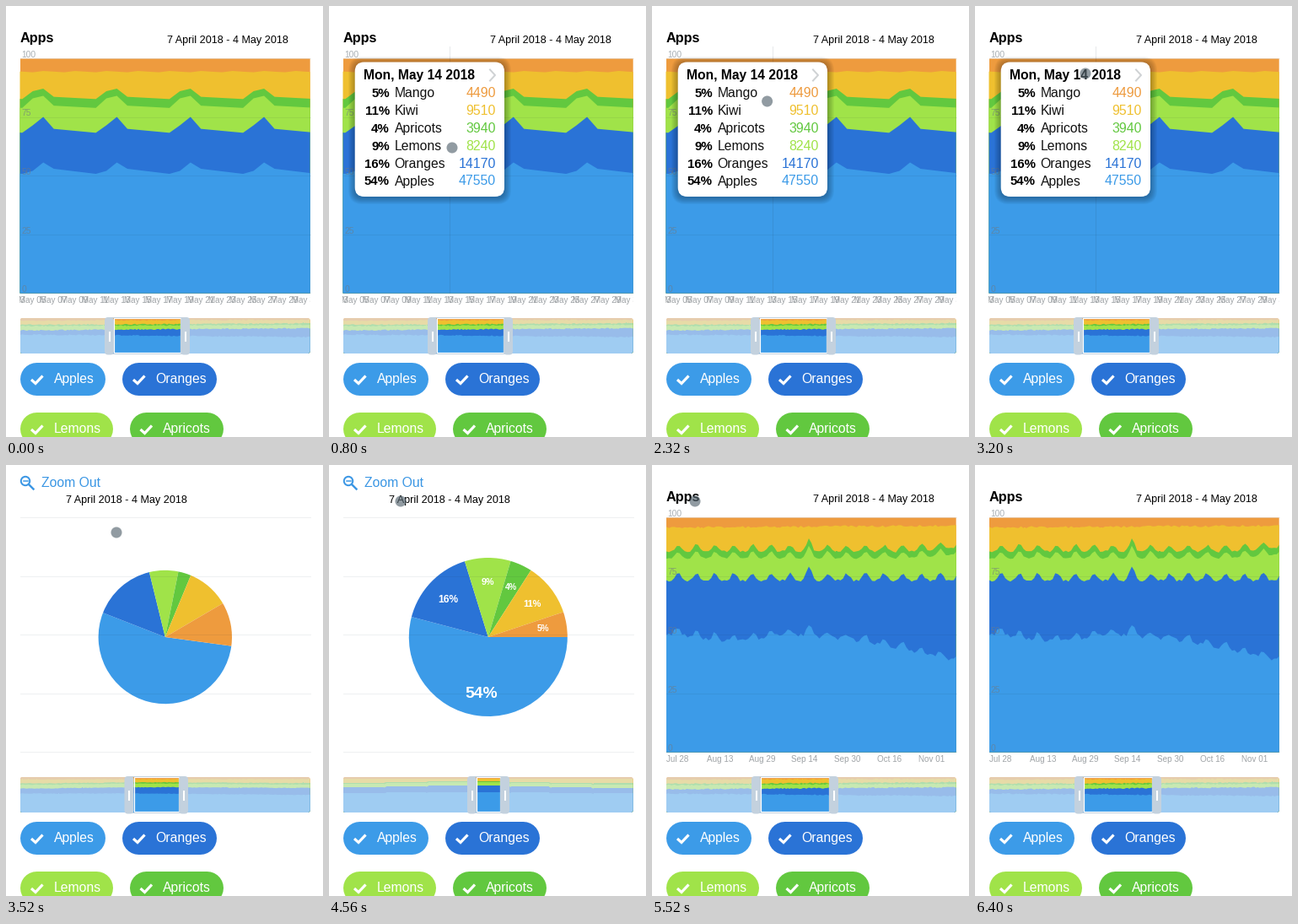
Recreate the animation shown at these times as a matplotlib script. Size 376 by 511 pixels, loop 6.56 s.

```python
import numpy as np
import matplotlib.pyplot as plt
from matplotlib.animation import FuncAnimation
from matplotlib.patches import Circle, FancyBboxPatch, Rectangle, Wedge

W, H, DPI = 376, 511, 100
STEP, FRAMES = 80, 82
LEFT, RIGHT, TOP, BASE = 16.5, 360.7, 62.5, 340.5
NAV_TOP, NAV_BASE = 370, 412
PIE_CENTER = (188.8, 204)
DAY, SUNDAY_X = 12.47, 131  # daily chart: pixels per day, place of May 13
WEEK = 22.25                # overview chart: pixels per week

NAMES = ["Apples", "Oranges", "Lemons", "Apricots", "Kiwi", "Mango"]
COLORS = ["#3c9be8", "#2a73d6", "#a0e349", "#62c83f", "#efc02f", "#ee9b3e"]
COUNTS = np.array([47550, 14170, 8240, 3940, 9510, 4490])
SHARES = np.round(100 * COUNTS / COUNTS.sum()).astype(int)
DATE_RANGE = "7 April 2018 - 4 May 2018"

plt.rcParams["font.family"] = "Liberation Sans"
fig = plt.figure(figsize=(W / DPI, H / DPI), dpi=DPI, facecolor="white")
ax = fig.add_axes([0, 0, 1, 1])


def pt(px):
    return px * 72 / DPI


def ramp(t, start, end):
    u = np.clip((t - start) / (end - start), 0, 1)
    return u * u * (3 - 2 * u)


def mix(a, b, u):
    return np.asarray(a) * (1 - u) + np.asarray(b) * u


# ---- data: boundary heights between layers, in stage pixels ----

def daily_data():
    day = np.arange(-10, 20)
    weekday = day % 7
    sunday, saturday = weekday == 0, weekday == 6
    late = weekday / 6 * ~saturday
    apples = 191 + 9 * late - 6 * sunday + 4 * saturday
    oranges = 144 + 7 * late - 13 * sunday - 3 * saturday
    lemons = 117 + 4 * late - 11 * sunday - 8 * saturday
    apricots = lemons - 10.5 + 2 * (sunday | saturday)
    kiwi = 77.3 + 0.9 * np.sin(2.1 * day)
    return SUNDAY_X + DAY * day, [apples, oranges, lemons, apricots, kiwi]


def overview_data():
    rng = np.random.default_rng(4)
    x = np.linspace(LEFT, RIGHT, 111)

    def noise(size):
        return rng.uniform(-size, size, x.size)

    phase = (x - 30 + WEEK / 2) % WEEK - WEEK / 2
    bump = np.exp(-(phase / 4.5) ** 2) * (1 + 0.8 * (abs(x - 187) < 9))
    trend = np.interp(x, [17, 95, 160, 200, 250, 361], [199, 209, 201, 203, 209, 232])
    apples = trend - 8 * bump + noise(2.5)
    oranges = 136.5 - 9 * bump + noise(1.5)
    lemons = 110 - 8 * bump - 4 * np.clip((x - 300) / 60, 0, 1) + noise(1)
    apricots = lemons - 8 + noise(1)
    kiwi = 73.5 - 2 * (x - LEFT) / 344 + noise(1.3)
    return x, [apples, oranges, lemons, apricots, kiwi]


def navigator_data():
    rng = np.random.default_rng(9)
    x = np.linspace(LEFT, RIGHT, 173)
    u = (x - LEFT) / (RIGHT - LEFT)
    ends = [(389, 392), (384, 381.5), (379, 377.5), (377.5, 375.8), (372.5, 371.5)]
    year = [mix(a, b, u) + rng.uniform(-0.7, 0.7, x.size) for a, b in ends]
    from_middle = abs(np.minimum((7 * u).astype(int), 6) - 2.5)
    apples = 387.5 + 0.5 * from_middle
    oranges = 379.8 + 0.9 * from_middle
    week = [apples, oranges, oranges - 4, oranges - 5.5, np.full(x.size, 372.0)]
    return x, year, week


DAILY, OVERVIEW = daily_data(), overview_data()
NAV_X, NAV_YEAR, NAV_WEEK = navigator_data()
PIE_END = np.append(0, np.cumsum(COUNTS)) / COUNTS.sum() * 360
PIE_START = [25, 216, 264, 270, 270, 303, 385]


# ---- drawing helpers ----

def text(x, y, s, px, color="black", **kw):
    return ax.text(x, y, s, fontsize=pt(px), color=color, va="baseline", **kw)


def line(xs, ys, color, px, **kw):
    ax.plot(xs, ys, color=color, lw=pt(px), **kw)


def rounded(x0, y0, x1, y1, r, **kw):
    return FancyBboxPatch((x0, y0), x1 - x0, y1 - y0, transform=ax.transData,
                          boxstyle=f"round,pad=0,rounding_size={r}", **kw)


def stack(x, tops, top, base, clip):
    back = Rectangle((LEFT, top), RIGHT - LEFT, base - top, fc=COLORS[5], lw=0)
    layers = [ax.add_patch(back)]
    for ys, color in zip(tops[::-1], COLORS[4::-1]):
        layers.append(ax.fill_between(x, ys, base, color=color, lw=0))
    for layer in layers:
        layer.set_clip_path(clip)


# ---- parts ----

def draw_header(zoomed):
    if zoomed < 1:
        text(16.5, 43, "Apps", 16.2, weight="bold", alpha=1 - zoomed)
        text(191, 44, DATE_RANGE, 12.65, alpha=1 - zoomed)
    if zoomed > 0:
        blue = "#3a96e4"
        ax.add_patch(Circle((23, 19), 5.2, fill=False, ec=blue, lw=pt(2), alpha=zoomed))
        line([27, 32.5], [23, 28.5], blue, 2.4, alpha=zoomed)
        line([20.5, 25.5], [19, 19], blue, 1.5, alpha=zoomed)
        text(42.5, 26, "Zoom Out", 15.7, blue, alpha=zoomed)
        text(71, 45, DATE_RANGE, 12.6, alpha=zoomed)


def draw_chart(data, openness):
    cx, cy = PIE_CENTER
    x0, x1 = mix([cx - 62, cx + 62], [LEFT, RIGHT], openness)
    y0, y1 = mix([cy - 62, cy + 62], [TOP, BASE], openness)
    stack(*data, TOP, BASE, rounded(x0, y0, x1, y1, 61.9 * (1 - openness)))


def draw_pie(growth):
    radius = mix(46, 94, growth)
    angles = mix(PIE_START, PIE_END, growth)
    shown = ramp(growth, 0.75, 1)
    for a, b, color, share in zip(angles, angles[1:], COLORS, SHARES):
        ax.add_patch(Wedge(PIE_CENTER, radius, a, b, fc=color, lw=0))
        middle, px = np.radians((a + b) / 2), 9 + 0.19 * share
        x = PIE_CENTER[0] + 0.7 * radius * np.cos(middle)
        y = PIE_CENTER[1] + 0.7 * radius * np.sin(middle)
        text(x, y + 0.36 * px, f"{share}%", px, "white",
             weight="bold", ha="center", alpha=shown)


def draw_axes(labels, daily):
    for i, y in enumerate(np.linspace(TOP, BASE, 5)):
        line([LEFT, RIGHT], [y, y], "#182d3b", 1, alpha=0.07)
        text(18.5, y - 1.5, str(100 - 25 * i), 10.2, "#6f7a82", alpha=0.6 * labels)
    if daily:
        marks = [(SUNDAY_X + DAY * (d - 13), f"May {d:02d}") for d in range(3, 32, 2)]
    else:
        dates = ["Jul 28", "Aug 13", "Aug 29", "Sep 14", "Sep 30", "Oct 16", "Nov 01"]
        marks = [(30 + 50.3 * i, s) for i, s in enumerate(dates)]
    window = Rectangle((LEFT - 1, BASE), RIGHT - LEFT + 1, 25, transform=ax.transData)
    for x, s in marks:
        label = text(x, 352.5, s, 9.9, "#8f9498", ha="center", alpha=0.85 * labels)
        label.set_clip_on(True)
        label.set_clip_path(window)


def draw_navigator(t, zoom):
    x0, x1 = mix([117, 218] if t < 4500 else [118, 221], [164, 214], zoom)
    frame = rounded(LEFT, NAV_TOP, RIGHT, NAV_BASE, 3)
    tops = [mix(a, b, zoom) for a, b in zip(NAV_YEAR, NAV_WEEK)]
    stack(NAV_X, tops, NAV_TOP, NAV_BASE, frame)
    for a, b in ((LEFT, x0 + 5), (x1 - 5, RIGHT)):
        shade = ax.add_patch(Rectangle((a, NAV_TOP), b - a, 42, fc="#e2eef9", alpha=0.6, lw=0))
        shade.set_clip_path(frame)
    ax.add_patch(Rectangle((x0 + 11, 370.5), x1 - x0 - 22, 40.5,
                           fill=False, ec="white", lw=pt(1.2)))
    for y in (NAV_TOP - 0.5, NAV_BASE + 0.5):
        line([x0 + 5, x1 - 5], [y, y], "#c3d1de", 1)
    for a in (x0, x1 - 11):
        ax.add_patch(rounded(a, 369, a + 11, 413.5, 4, fc="#c3d1de", lw=0))
        line([a + 5.5] * 2, [387, 397], "white", 2)


def draw_buttons():
    spots = [(16.5, 117.5, 423), (137.5, 249, 423), (16.5, 126, 482), (146, 257.5, 482)]
    for (x0, x1, y), name, color in zip(spots, NAMES, COLORS):
        line([x0 + 19.5, x1 - 19.5], [y + 19.5] * 2, color, 39, solid_capstyle="round")
        line([x0 + 13.5, x0 + 18.5, x0 + 27], [y + 20, y + 24.5, y + 15.5], "white", 3.2,
             solid_joinstyle="miter", solid_capstyle="butt")
        text(x0 + 40, y + 24, name, 15.7, "white")


def draw_tooltip(alpha):
    line([143, 143], [48, BASE], "#182d3b", 1, alpha=0.1 * alpha)
    for grow in range(8, 0, -1):
        ax.add_patch(rounded(31 - grow, 68 - grow, 208 + grow, 227 + grow, 9 + grow,
                             fc="black", lw=0, alpha=0.035 * alpha, zorder=4))
    ax.add_patch(rounded(30.7, 66.5, 208, 226, 11, fc="white", lw=0, alpha=alpha, zorder=4))
    style = dict(alpha=alpha, zorder=5)
    text(41, 87, "Mon, May 14 2018", 15.6, weight="bold", **style)
    line([191, 197, 191], [75.5, 82, 88.5], "#cfd2d4", 2, **style)
    for i in range(6):
        k, y = 5 - i, 108 + 20.9 * i
        text(72, y, f"{SHARES[k]}%", 15, weight="bold", ha="right", **style)
        text(77.5, y, NAMES[k], 15.7, "#111111", **style)
        text(198, y, str(COUNTS[k]), 15.9, COLORS[k], ha="right", **style)


def draw_pointer(t):
    times = [80, 1920, 2560, 3760, 4560, 4880]
    x = np.interp(t, times, [146, 146, 131, 131, 85, 51])
    y = np.interp(t, times, [168, 168, 80, 80, 43, 43])
    alpha = ramp(t, 0, 80) - ramp(t, 6080, 6400)
    ax.add_patch(Circle((x, y), 6.5, fc="#566670", lw=0, alpha=0.65 * alpha, zorder=10))


def draw(frame):
    t = frame * STEP
    ax.cla()
    ax.set_xlim(0, W)
    ax.set_ylim(H, 0)
    ax.axis("off")

    draw_header(ramp(t, 3240, 3440) - ramp(t, 5120, 5400))
    openness = 0
    if t < 3400:
        openness = 1 - ramp(t, 3200, 3440)
        draw_chart(DAILY, openness)
    elif t < 5160:
        growth = 1 - (1 - np.clip((t - 3360) / 360, 0, 1)) ** 2
        draw_pie(growth - ramp(t, 4960, 5200))
    else:
        openness = ramp(t, 5080, 5440)
        draw_chart(OVERVIEW, openness)
    draw_axes(openness, t < 4500)
    draw_navigator(t, ramp(t, 3280, 3760) - ramp(t, 4960, 5400))
    draw_buttons()
    tip = ramp(t, 80, 320) - ramp(t, 3200, 3360)
    if tip > 0:
        draw_tooltip(tip)
    draw_pointer(t)
    return []


anim = FuncAnimation(fig, draw, frames=FRAMES, interval=STEP, repeat=True,
                     repeat_delay=0, init_func=lambda: [])
plt.show()
```
